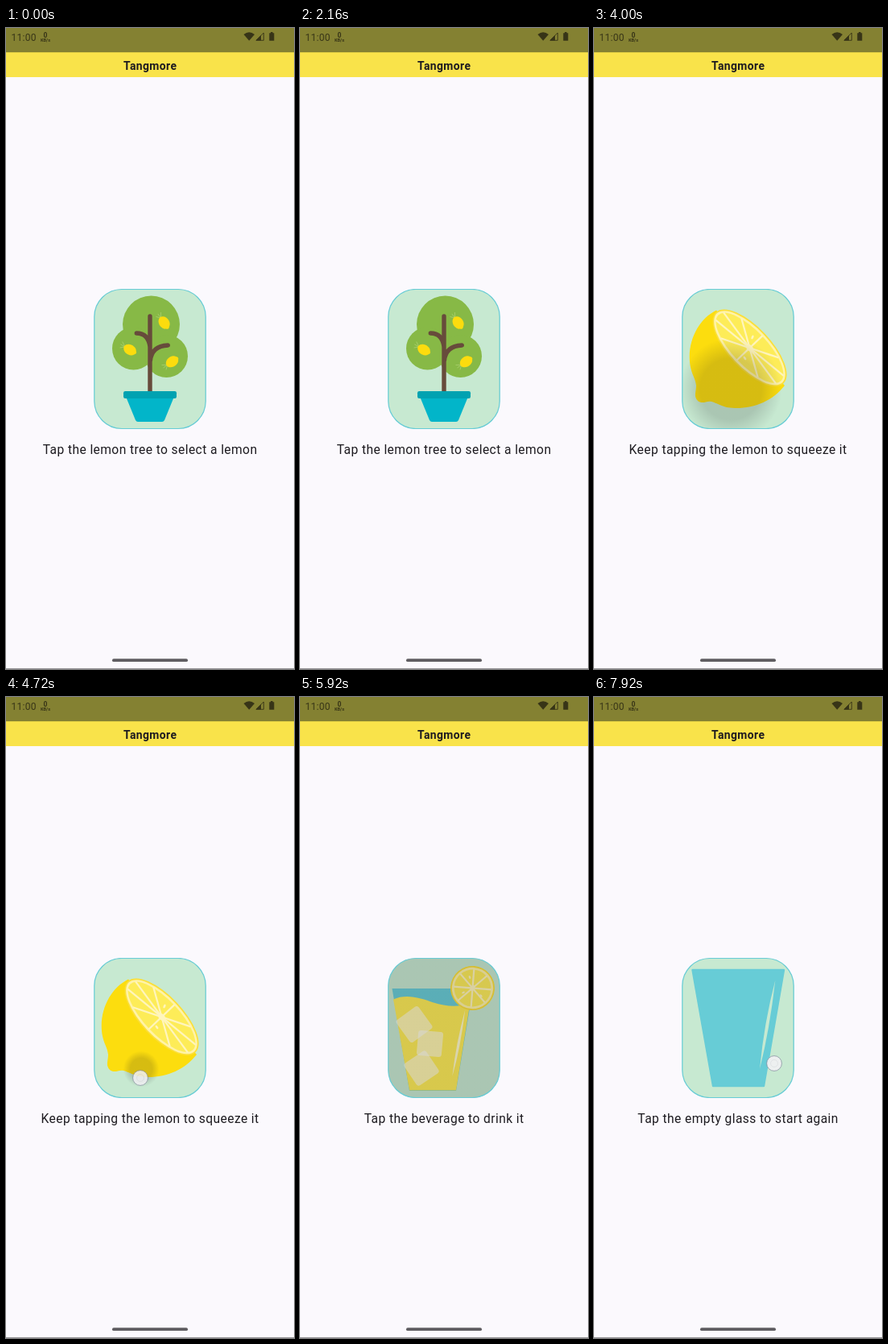
These frames come from a looping animation (358 by 796 pixels, 8000 ms). An HTML page:

```html
<!DOCTYPE html>
<html lang="en">
<head>
<meta charset="utf-8">
<title>Tangmore</title>
<style>
  html, body { margin: 0; width: 100%; height: 100%; overflow: hidden; background: #fbf9fd; }
  svg { display: block; width: 100%; height: 100%; }
  text { font-family: Roboto, sans-serif; fill: #1d1b20; }
  .mid { text-anchor: middle; letter-spacing: .41px; }
  .status text, .status .ink { fill: #373417; }
  .spoke { stroke: #fff5bd; stroke-width: 2.2; }
</style>
</head>
<body>
<svg viewBox="0 0 358 796" xmlns="http://www.w3.org/2000/svg">
  <defs>
    <clipPath id="cardClip"><rect x="109.5" y="324.2" width="139" height="173.6" rx="34.4"/></clipPath>
    <radialGradient id="wave" gradientUnits="userSpaceOnUse">
      <stop offset="0" stop-color="#1d1b20"/>
      <stop offset=".6" stop-color="#1d1b20"/>
      <stop offset="1" stop-color="#1d1b20" stop-opacity="0"/>
    </radialGradient>
  </defs>

  <rect width="358" height="796" fill="#fbf9fd"/>
  <rect width="358" height="31" fill="#848132"/>
  <rect y="30.2" width="358" height="30.8" fill="#f9e34a"/>
  <text class="mid" x="179.2" y="51.5" font-size="13.92" font-weight="700">Tangmore</text>

  <g class="status">
    <text x="6.5" y="15.5" font-size="12" letter-spacing=".3">11:00</text>
    <text x="49" y="11.5" font-size="8.5" font-weight="700" text-anchor="middle">0</text>
    <text x="49" y="17" font-size="5.6" font-weight="700" text-anchor="middle">KB/s</text>
    <path class="ink" d="M295.5 8Q302.2 2.6 309 8L302.2 15.8Z"/>
    <path class="ink" d="M310.5 15.5L317 9V15.5Z"/>
    <path d="M311 15.3L320.3 6V15.3Z" fill="none" stroke="#373417" stroke-width=".9"/>
    <path class="ink" d="M329 5h2.6v1.2h1.7v9.6h-6V6.2h1.7Z"/>
  </g>

  <g clip-path="url(#cardClip)">
    <rect x="109" y="324" width="140" height="174" fill="#c7e9d1"/>

    <g class="scene">
      <g fill="#87b946">
        <circle cx="180.5" cy="368" r="35.5"/>
        <circle cx="158.5" cy="398" r="26.5"/>
        <circle cx="199.5" cy="407.5" r="26.5"/>
      </g>
      <path d="M179 358V454M162.3 379Q177 379 179 396M201.3 394Q181 395 179.4 413"
            fill="none" stroke="#674b3b" stroke-width="5.4" stroke-linecap="round"/>
      <g id="fruit"></g>
      <path d="M149.5 459H208.5L197 487Q196 489 194 489H164Q162 489 161 487Z" fill="#02b5c9"/>
      <rect x="146" y="451" width="66" height="9" rx="2.2" fill="#00a2b1"/>
    </g>

    <g class="scene">
      <path d="M152 350.5C133 360 119 382 118.7 408C118.7 428 126 433 127 444
               C127 450 125 455 126.5 459C128.5 465 134 466 139 464.5C150 461 155 472 175 472
               C200 472.5 222 463 237 444Z" fill="#fcdd0e"/>
      <g class="slice" data-at="193.5,397.3,46.5" data-r="61,26" data-cuts="5"></g>
      <g fill="#fff5bd">
        <ellipse cx="197" cy="384" rx="2.6" ry="1.4" transform="rotate(-65 197 384)"/>
        <ellipse cx="187.5" cy="410" rx="2.6" ry="1.4" transform="rotate(55 187.5 410)"/>
      </g>
    </g>

    <g class="scene">
      <path d="M114.5 362H215L194 489H136Z" fill="#67ccd6"/>
      <path d="M116 375.5C132 368 151 374 166 379.5C181 384.5 196 385 211.3 381L194 488.5H136Z" fill="#feec55"/>
      <g id="ice" fill="#fff" fill-opacity=".52"></g>
      <path d="M205.3 388Q199.5 436 189.3 471Q194 430 205.3 388Z" fill="#fffac9"/>
      <g class="slice" data-at="214.5,361.5,27" data-r="27.5,27.5" data-cuts="4"></g>
      <g fill="#fff5bd">
        <ellipse cx="211" cy="348" rx="2" ry="1.2" transform="rotate(70 211 348)"/>
        <ellipse cx="203" cy="367" rx="2" ry="1.2" transform="rotate(-25 203 367)"/>
        <ellipse cx="225" cy="371" rx="2" ry="1.2" transform="rotate(45 225 371)"/>
      </g>
    </g>

    <g class="scene">
      <path d="M122.5 339H236L211 483H148Z" fill="#67ccd6" stroke="#67ccd6" stroke-width="2.4" stroke-linejoin="round"/>
      <path d="M225.3 352Q218.5 412 206 462Q211.5 404 225.3 352Z" fill="#c7e9d1"/>
    </g>

    <rect id="ripple" x="109" y="324" width="140" height="174" fill="url(#wave)"/>
  </g>
  <rect x="109.8" y="324.5" width="138.4" height="173" rx="34.2" fill="none" stroke="#67ccd6" stroke-width="1.2"/>
  <text id="hint" class="mid" x="179.1" y="528.8" font-size="15.6"></text>
  <g id="dot">
    <circle r="9.4" fill="#f2f1f4" stroke="#7b8596" stroke-opacity=".75"/>
    <circle r="4.5" fill="none" stroke="#7b8596" stroke-opacity=".12"/>
  </g>

  <rect x="132" y="783.3" width="94" height="3.8" rx="1.9" fill="#5f5d61"/>
  <rect y="795" width="358" height="1" fill="#99979b"/>
</svg>
<script>
const LOOP = 8000, STEP = 80;
const $ = id => document.getElementById(id);
const clamp = v => Math.max(0, Math.min(1, v));

const hints = [
  'Tap the lemon tree to select a lemon',
  'Keep tapping the lemon to squeeze it',
  'Tap the beverage to drink it',
  'Tap the empty glass to start again'
];
const swaps = [2720, 5520, 7040];
const taps = [
  { at: 2560, wave: 2720, x: 172, y: 440, alpha: .85 },
  { at: 3840, wave: 3880, x: 167, y: 468, alpha: .85 },
  { at: 4640, wave: 4680, x: 167, y: 473, alpha: .85 },
  { at: 5440, wave: 5500, x: 144.5, y: 406, alpha: .65 },
  { at: 6880, wave: 7020, x: 232, y: 466, alpha: .85 },
  { at: 7920, wave: 8000, x: 224, y: 455, alpha: .9 }
];

// Citrus cross-section, centred and turned as its data attributes say
function slice(g) {
  const [x, y, turn] = g.dataset.at.split(',');
  const [rx, ry] = g.dataset.r.split(',').map(Number);
  const cuts = +g.dataset.cuts;
  const ring = (inset, fill) => `<ellipse rx="${rx - inset}" ry="${ry - inset}" fill="${fill}"/>`;
  let out = ring(0, '#fbdf38') + ring(1.8, '#fff3a8') + ring(4.6, '#fdec58');
  for (let i = 0; i < cuts; i++) {
    const a = Math.PI * (i + .5) / cuts;
    const px = (rx - 4) * Math.cos(a), py = (ry - 4) * Math.sin(a);
    out += `<line class="spoke" x1="${-px}" y1="${-py}" x2="${px}" y2="${py}"/>`;
  }
  g.innerHTML = out + `<ellipse rx="${rx * .09}" ry="${ry * .14}" fill="#fff5bd"/>`;
  g.setAttribute('transform', `translate(${x} ${y}) rotate(${turn})`);
}
document.querySelectorAll('.slice').forEach(slice);

$('fruit').innerHTML = [[196.6, 366, 55], [154, 399.5, 30], [206.5, 414.3, -35]].map(([x, y, r]) =>
  `<g transform="translate(${x} ${y}) rotate(${r})">
     <path d="M-7 0L-13 -4M-7 0L-13.5 0M-7 0L-12 4" stroke="#a9cf6c" stroke-width=".8"/>
     <path d="M-8.5 0C-7 -8 5 -8 7.5 -2.5Q10.5 0 7.5 2.5C5 8 -7 8 -8.5 0Z" fill="#fcdc0e"/>
   </g>`).join('');

$('ice').innerHTML = [[142, 406.5, 34, -36], [161.5, 430.5, 31, 5], [151, 461, 33, -34]].map(([x, y, s, r]) =>
  `<rect x="${-s / 2}" y="${-s / 2}" width="${s}" height="${s}" rx="3.5" transform="translate(${x} ${y}) rotate(${r})"/>`).join('');

const scenes = document.querySelectorAll('.scene');
const lastTap = (t, key) => taps.filter(tap => tap[key] <= t).pop();

function drawRipple(t) {
  const tap = lastTap(t, 'wave');
  const age = tap ? t - tap.wave : LOOP;
  const grow = clamp(age / 450);
  const wave = $('wave');
  if (tap) {
    wave.setAttribute('cx', tap.x + (179 - tap.x) * grow);
    wave.setAttribute('cy', tap.y + (411 - tap.y) * grow - 6 * (1 - grow));
  }
  wave.setAttribute('r', 2 + 230 * grow);
  $('ripple').setAttribute('opacity', .17 * clamp((790 - age) / 310));
}

function drawDot(t) {
  const tap = lastTap(t, 'at');
  const on = tap && t - tap.at < 160;
  const dot = $('dot');
  dot.setAttribute('opacity', on ? tap.alpha : 0);
  if (on) dot.setAttribute('transform', `translate(${tap.x} ${tap.y})`);
}

function render(t) {
  const stage = swaps.filter(s => s <= t).length;
  scenes.forEach((s, i) => s.setAttribute('display', i === stage ? 'inline' : 'none'));
  $('hint').textContent = hints[stage];
  drawRipple(t);
  drawDot(t);
}

const start = performance.now();
function tick() {
  const t = (performance.now() - start) % LOOP;
  render(Math.floor(t / STEP) * STEP);
  requestAnimationFrame(tick);
}
tick();
</script>
</body>
</html>
```
